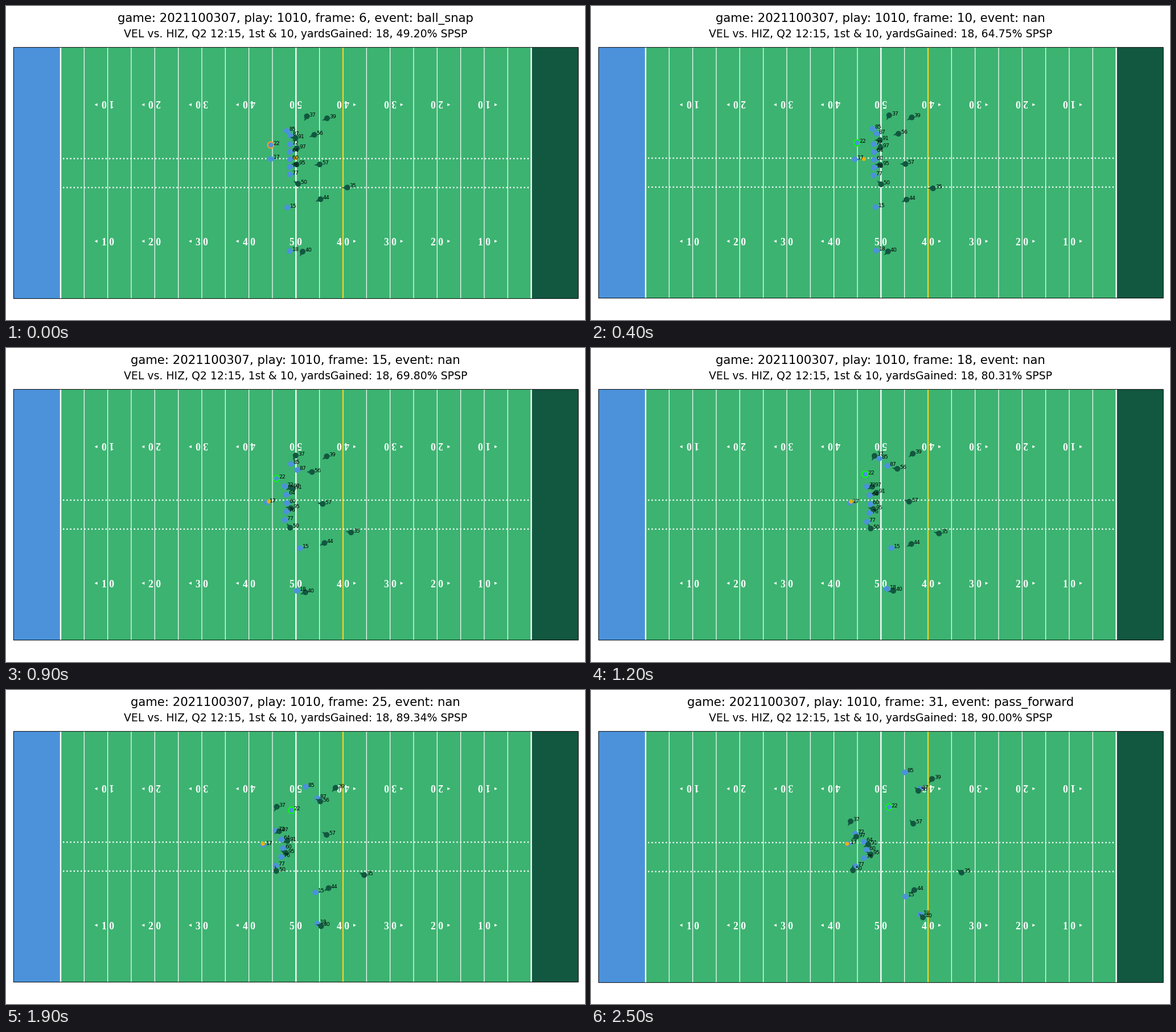
Write a matplotlib script that moves like this. It is 1017 px wide and 551 px high and loops after 2600 ms.

```python
import numpy as np
import matplotlib.pyplot as plt
from matplotlib.animation import FuncAnimation
from matplotlib.patches import Circle, Polygon, Rectangle

W, H, DPI = 1017, 551, 64
FRAMES, INTERVAL = 26, 100
YARD = 992 / 120
LEFT, TOP, BOTTOM = 13.3, 72.6, 512.6
HASHES = (267, 317.8)
GRASS, HOME, AWAY = "#3CB371", "#4B92DB", "#125740"

T = np.arange(FRAMES)[:, None]
MID, END = 15, FRAMES - 1

plt.rcParams["font.family"] = "DejaVu Sans"
fig = plt.figure(figsize=(W / DPI, H / DPI), dpi=DPI, facecolor="white")
ax = fig.add_axes([0, 0, 1, 1])
ax.set(xlim=(0, W), ylim=(H, 0))
ax.axis("off")


def pt(pixels):
    return pixels * 72 / DPI


def yard_x(yards):
    return LEFT + yards * YARD


def route(start, mid, end):
    """Start from rest, pass the middle point smoothly, then accelerate evenly."""
    a, b, c = (np.array(p, float) for p in (start, mid, end))
    v = 0.4 * (b - a) / MID + 0.6 * (c - b) / (END - MID)
    s = T / MID
    opening = a + (b - a) * s**2 * (3 - 2 * s) + MID * v * s**2 * (s - 1)
    u = T - MID
    closing = b + v * u + (c - b - v * (END - MID)) * (u / (END - MID))**2
    return np.where(T < MID, opening, closing)


# --- field ---------------------------------------------------------------
def block(first, last, color):
    return ax.add_patch(Rectangle((yard_x(first), TOP), (last - first) * YARD,
                                  BOTTOM - TOP, color=color, lw=0, zorder=0))


def vline(yards, color, width):
    return ax.plot([yard_x(yards)] * 2, [TOP, BOTTOM], color=color, lw=pt(width),
                   solid_capstyle="butt", snap=False, zorder=1)[0]


def marking(yards):
    x, side = yard_x(yards), np.sign(yards - 60)
    for flip in (1, -1):
        ax.text(x, 292.5 + flip * 122.7, f"{5 - abs(yards - 60) // 10} 0",
                color="white", size=pt(17.65), weight="bold",
                family="Liberation Serif", ha="center", va="center",
                rotation=90 - 90 * flip, zorder=2)
        if side:
            base, tip, y = x + side * 18, x + side * 23, 293 + flip * 119.8
            ax.add_patch(Polygon([(base, y - 2.6), (base, y + 2.6), (tip, y)],
                                 color="white", lw=0, zorder=2))


blocks = [block(0, 10, HOME), block(10, 110, GRASS), block(110, 120, AWAY)]
lines = [vline(y, "white", 2.35 if y % 50 == 10 else 1.2) for y in range(10, 111, 5)]
lines.append(vline(70, "#F1D325", 2.35))
border = ax.add_patch(Rectangle((LEFT, TOP), 120 * YARD, BOTTOM - TOP, fill=False,
                                ec="black", lw=pt(0.95), snap=False, zorder=3))
hashes = [ax.plot([100, 921], [y, y], color="white", lw=pt(2.35), ls=(0, (1, 1.65)),
                  dash_capstyle="butt", snap=False, zorder=1.2)[0] for y in HASHES]
for yards in range(20, 101, 10):
    marking(yards)


# --- players -------------------------------------------------------------
class Player:
    def __init__(self, number, color, start, mid, end, turn=(0, 0)):
        self.path = route(start, mid, end)
        self.angle = np.radians(np.linspace(*turn, FRAMES))
        z = 4 if color == HOME else 5
        self.dot = ax.add_patch(Circle((0, 0), 5, color=color, lw=0, zorder=z))
        self.tail = ax.add_patch(Polygon(np.zeros((3, 2)), color=color, lw=0, zorder=z))
        self.label = ax.text(0, 0, str(number), size=pt(9.42), color="black",
                             ha="left", va="baseline", zorder=8)

    def pose(self, i):
        pos, a = self.path[i], self.angle[i]
        ahead = np.array([np.cos(a), -np.sin(a)])
        across = ahead[::-1] * [-1, 1]
        self.dot.center = pos
        self.tail.set_xy([pos + 3.2 * across, pos - 3.2 * across, pos + 10 * ahead])
        self.label.set_position((pos[0] + 4.1, pos[1]))


back = Player(22, HOME, (465, 244), (489.5, 216), (523.5, 205.5), (0, -120))
players = [
    back,
    Player(17, HOME, (465, 268.5), (453, 272), (451, 270)),
    Player(85, HOME, (493, 219), (513.5, 184), (551, 144.5)),
    Player(87, HOME, (499, 227), (530.5, 199.5), (577.5, 173.5)),
    Player(15, HOME, (494, 353.5), (535.5, 352), (552, 362.5)),
    Player(18, HOME, (498, 430), (530, 418), (578.5, 394)),

    Player(37, AWAY, (528.5, 193.5), (488, 193.5), (456, 230.5), (240, 240)),
    Player(39, AWAY, (564, 197), (569.5, 180), (599, 156), (205, 235)),
    Player(56, AWAY, (541.5, 226), (542, 205.5), (575, 177), (205, 135)),
    Player(91, AWAY, (508.5, 231.5), (498.5, 259.5), (487, 271), (175, 210)),
    Player(97, AWAY, (511, 249.5), (488, 244), (466, 257.5), (210, 210)),
    Player(95, AWAY, (510.5, 278), (493, 284), (491.5, 288.5), (180, 150)),
    Player(57, AWAY, (551, 278), (561, 264), (566, 234.5), (188, 135)),
    Player(50, AWAY, (513, 312), (484, 317.5), (460, 316.5), (148, 90)),
    Player(35, AWAY, (599.5, 318.5), (618, 326), (651, 320.5), (183, 145)),
    Player(44, AWAY, (552.5, 339), (565, 345.5), (568, 351), (205, 215)),
    Player(40, AWAY, (521, 431), (539, 422), (583, 399), (240, 135)),
]
# The offensive line starts straight and bends back into a pocket.
for k, number in enumerate((77, 76, 60, 64, 72)):
    bend = (k - 2)**2
    players.append(Player(number, HOME, (498.5, 295.5 - 13.2 * k),
                          (488.5 - 2.2 * bend, 307 - 15.7 * k),
                          (484 - 5 * bend, 309 - 14.2 * k)))

ring = ax.add_patch(Circle((0, 0), 5.4, fill=False, lw=pt(2.1), zorder=6))
ball = ax.add_patch(Circle((0, 0), 3.6, color="#E8B010", lw=0, zorder=7))

# --- captions ------------------------------------------------------------
title = ax.text(508.5, 28, "", size=pt(21.26), ha="center", va="baseline")
subtitle = ax.text(508.5, 55, "", size=pt(18.9), ha="center", va="baseline")
chance = np.interp(T[:, 0], [0, 4, 9, 15, 19, 23, 25],
                   [49.20, 64.75, 69.80, 90.83, 89.34, 86.10, 90.00])
EVENTS = {0: "ball_snap", END: "pass_forward"}


def draw(i):
    # Underscores in the caption push the field down a little.
    drop = 0.8 if i in EVENTS else 0
    for patch in blocks + [border]:
        patch.set_height(BOTTOM + drop - TOP)
    for line in lines:
        line.set_ydata([TOP, BOTTOM + drop])
    for line, y in zip(hashes, HASHES):
        line.set_ydata([y + drop] * 2)

    for player in players:
        player.pose(i)
    ring.center = back.path[i]
    ring.set_edgecolor("#0CF80C" if chance[i] > 50 else "#FF9A2A")
    flight = np.exp(-i / 5.8)
    ball.center = (449 + 60 * flight, 269.8 - 2.8 * flight)

    title.set_text(f"game: 2021100307, play: 1010, frame: {i + 6}, "
                   f"event: {EVENTS.get(i, 'nan')}")
    subtitle.set_text("VEL vs. HIZ, Q2 12:15, 1st & 10, yardsGained: 18, "
                      f"{chance[i]:.2f}% SPSP")
    return []


anim = FuncAnimation(fig, draw, frames=FRAMES, init_func=lambda: draw(0),
                     interval=INTERVAL, repeat=True, repeat_delay=0, blit=False)
plt.show()
```
